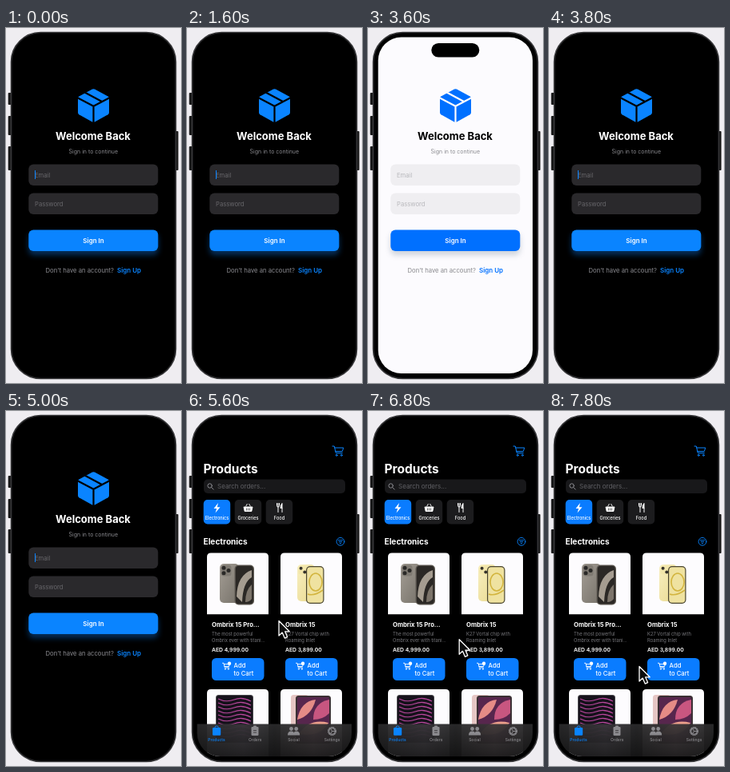
Recreate the animation shown at these times as an HTML page. Size 219x444 px, loop 8 s.

```html
<!DOCTYPE html>
<html lang="en">
<head>
<meta charset="utf-8">
<title>Shop sign-in</title>
<style>
  html, body { margin: 0; width: 100%; height: 100%; overflow: hidden; background: #efedf1; }
  svg { display: block; width: 100%; height: 100%; font-family: Inter, sans-serif; }
  .dark { --bg: #000; --ink: #fff; --muted: #8a8a8f; --hint: #68676b; --field: #2a292c; --blue: #0a84ff; --glow: #0a84ff; --glow-alpha: .36; }
  .light { --bg: #fcfbfe; --ink: #000; --muted: #8a8a8e; --hint: #b8b8bc; --field: #efeef1; --blue: #0070ff; --glow: #4a6078; --glow-alpha: .26; }
  .bg { fill: var(--bg); }
  .ink { fill: var(--ink); }
  .muted { fill: var(--muted); }
  .hint { fill: var(--hint); }
  .field { fill: var(--field); }
  .blue { fill: var(--blue); }
  .mid { text-anchor: middle; }
  .b { font-weight: 700; }
  .sb { font-weight: 600; }
  .line { fill: none; stroke: currentColor; stroke-linecap: round; stroke-linejoin: round; }
</style>
</head>
<body>
<svg viewBox="0 0 219 444" preserveAspectRatio="none" xmlns="http://www.w3.org/2000/svg">
  <defs>
    <clipPath id="screen"><rect x="12.700" y="11.500" width="193.300" height="420.500" rx="29"/></clipPath>
    <filter id="blur" x="-20%" y="-60%" width="140%" height="220%"><feGaussianBlur stdDeviation="3.600"/></filter>
    <linearGradient id="titanium" x2="1" y2="1"><stop stop-color="#a39d94"/><stop offset="1" stop-color="#77726a"/></linearGradient>
    <linearGradient id="yellow" x2="1" y2="1"><stop stop-color="#f8efc0"/><stop offset="1" stop-color="#e9d98f"/></linearGradient>
    <linearGradient id="bar" x2="1"><stop stop-color="#29292a"/><stop offset=".3" stop-color="#373539"/><stop offset=".5" stop-color="#29292a"/><stop offset=".75" stop-color="#3b3638"/><stop offset="1" stop-color="#29292a"/></linearGradient>
    <linearGradient id="fade" x2="0" y2="1"><stop stop-opacity="0"/><stop offset="1" stop-opacity=".5"/></linearGradient>

    <g id="cart" class="line">
      <path d="M0 .5h2.300l2 8.500h8M2.800 2.500h11l-1.500 4.500H3.900"/>
      <circle cx="5.200" cy="11.800" r="1"/><circle cx="11.300" cy="11.800" r="1"/>
    </g>
  </defs>

  <!-- phone body -->
  <g fill="#161617">
    <rect x="2.700" y="81" width="5" height="15" rx="1"/>
    <rect x="2.700" y="110" width="5" height="24" rx="1"/>
    <rect x="2.700" y="148" width="5" height="30" rx="1"/>
    <rect x="211" y="129" width="4.600" height="49" rx="1"/>
  </g>
  <rect x="6.400" y="5.400" width="206.200" height="433.200" rx="37" fill="#0b0b0c" stroke="#38383a" stroke-width="1.400"/>
  <rect x="8.500" y="7.500" width="202" height="429" rx="34" fill="#000"/>

  <g clip-path="url(#screen)">
    <g id="login" class="dark">
      <rect class="bg" width="219" height="444"/>
      <path class="blue" d="M108 76.600q1.500-.8 3 0L127.600 85.500q1.400.8 1.400 2.300v18q0 1.600-1.400 2.400L111 117.400q-1.500.8-3 0L91.400 108.200q-1.400-.8-1.400-2.400v-18q0-1.500 1.400-2.300z"/>
      <path d="M89.500 87.200L109.500 97.800L129.500 87.200M109.500 97.800V119M98.500 80.500L120 92" fill="none" stroke="var(--bg)" stroke-width="2.200"/>
      <text class="ink b mid" x="109" y="139.800" font-size="13">Welcome Back</text>
      <text class="muted mid" x="109.300" y="157" font-size="7">Sign in to continue</text>
      <rect class="field" x="28.300" y="170.500" width="162" height="26.500" rx="6"/>
      <rect class="field" x="28.300" y="206.500" width="162" height="26.500" rx="6"/>
      <text class="hint" x="36" y="187" font-size="7.700">Email</text>
      <text class="hint" x="36" y="222.700" font-size="7.700">Password</text>
      <rect id="caret" class="blue" x="36" y="178" width="1" height="11"/>
      <rect x="28.300" y="257" width="162" height="27" rx="6" fill="var(--glow)" opacity="var(--glow-alpha)" filter="url(#blur)"/>
      <rect class="blue" x="28.300" y="252.500" width="162" height="26.500" rx="6"/>
      <text class="sb mid" x="109.500" y="268.800" font-size="8" fill="#fff">Sign In</text>
      <text class="muted" x="49.500" y="306.200" font-size="7.700">Don't have an account?</text>
      <text class="blue sb" x="139" y="306.200" font-size="8">Sign Up</text>
    </g>

    <g id="shop" class="dark" visibility="hidden">
      <rect width="219" height="444"/>
      <use href="#cart" x="182" y="43.500" color="#0a84ff"/>
      <text class="b ink" x="20.500" y="78" font-size="15.500">Products</text>
      <rect x="21" y="85.500" width="177" height="17.500" rx="5" fill="#18181a"/>
      <g class="line" color="#8a8a8f"><circle cx="28.600" cy="93.500" r="2.700"/><path d="M30.700 95.600l2.500 2.500"/></g>
      <text x="38" y="97" font-size="8" fill="#606065">Search orders...</text>
      <g id="chips"></g>
      <path d="M39 115l-5.500 7h3.600l-1.600 5.500 6-7.200h-3.700z" fill="#fff"/>
      <path d="M71 120h11l-1.200 5.500h-8.600zM73.500 119.500l2-3.500M79.500 119.500l-2-3.500" fill="#fff" stroke="#fff" stroke-width=".9"/>
      <path d="M74.500 121.500v3M76.500 121.500v3M78.500 121.500v3" stroke="#1c1c1e" stroke-width=".7"/>
      <g class="line" color="#fff"><path d="M112.500 115.500v3q0 1.500 1.500 1.500t1.500-1.500v-3M114 115.500v11"/><path d="M119 126.500v-11q-2 2-2 6h2" fill="#fff"/></g>
      <text class="b ink" x="20.500" y="167" font-size="10.100">Electronics</text>
      <g class="line" color="#0a84ff" stroke-width=".9"><circle cx="192" cy="163.300" r="4.900"/><path d="M189.200 161.600h5.600M190.200 163.600h3.600M191.200 165.600h1.600"/></g>
      <g id="cards"></g>

      <!-- product pictures -->
      <g>
        <rect x="41" y="191" width="24" height="49" rx="5" fill="url(#titanium)"/>
        <rect x="42.500" y="192.500" width="13" height="14" rx="3.500" fill="#7f7a72"/>
        <g fill="#2a2927"><circle cx="46" cy="196.300" r="2.500"/><circle cx="46" cy="202.800" r="2.500"/><circle cx="52" cy="199.500" r="2.500"/></g>
        <rect x="59.500" y="192.500" width="24.500" height="50" rx="5" fill="#5e5952"/>
        <rect x="60.800" y="193.800" width="21.900" height="47.400" rx="4" fill="#2b2825"/>
        <path d="M62 232q1-27 19-33v9q-11 6-12 31z" fill="#a59c90"/>
        <path d="M73 239q0-15 8-22v18q-3 4-8 4z" fill="#7c746a"/>
      </g>
      <g>
        <rect x="138" y="192" width="22" height="46" rx="5" fill="url(#yellow)"/>
        <rect x="139.500" y="193.500" width="11" height="11" rx="3" fill="#f2e6aa"/>
        <g fill="#37342c"><circle cx="142.600" cy="196.700" r="2"/><circle cx="147.300" cy="201.400" r="2"/></g>
        <rect x="149" y="194" width="22.500" height="47" rx="5" fill="#4b4630"/>
        <rect x="150.200" y="195.200" width="20.100" height="44.600" rx="4" fill="#efe2a0"/>
        <g fill="none" stroke="#d3b53f" stroke-width="1.600"><ellipse cx="161" cy="214" rx="8" ry="11"/><path d="M151 229q8 3 19-5"/></g>
      </g>
      <g>
        <rect x="36" y="355" width="47" height="60" rx="3.500" fill="#49484c"/>
        <rect x="37" y="356" width="45" height="58" rx="2.500" fill="#17121c"/>
        <path id="strands" fill="none" stroke="#b8479c" stroke-width="1.100"/>
      </g>
      <g>
        <rect x="130" y="355" width="22" height="60" rx="3.500" fill="#e6c6c4"/>
        <rect x="136" y="356" width="44" height="60" rx="3.500" fill="#3b3034"/>
        <rect x="138" y="358" width="40" height="56" rx="2" fill="#57264d"/>
        <path d="M138 386q4-23 23-25-5 20-23 25z" fill="#e58b86"/>
        <path d="M158 386q0-21 20-25v17q-8 8-20 8z" fill="#c85680"/>
        <path d="M140 404q13-20 37-14-9 18-37 14z" fill="#eda08c"/>
      </g>

      <g>
        <rect x="12" y="391.500" width="195" height="42" fill="url(#bar)" opacity=".96"/>
        <rect x="12" y="391.500" width="195" height="42" fill="url(#fade)"/>
      </g>
      <g id="tabs"></g>
      <rect x="32" y="396" width="10.200" height="9.800" rx="1.300" fill="#0a84ff"/>
      <path d="M35 396.300v-.6q0-1.700 2.100-1.700t2.100 1.700v.6" fill="none" stroke="#0a84ff"/>
      <g fill="#8b8a8e">
        <rect x="80.500" y="395" width="9" height="11" rx="1.200"/><rect x="83" y="393.500" width="4" height="3" rx="1"/>
        <circle cx="130.500" cy="397.500" r="2.400"/><circle cx="136.700" cy="397.500" r="2.400"/>
        <path d="M126 405.500q0-5 4.500-5 3 0 3.200 2 .4-2 3-2 4.500 0 4.500 5z"/>
      </g>
      <path d="M83 399.500h4M83 402h4" stroke="#302e31" stroke-width=".8"/>
      <g class="line" color="#8b8a8e"><circle cx="181.500" cy="400.500" r="4.700" stroke-width="1.600" stroke-dasharray="2.100 .36" stroke-linecap="butt"/><circle cx="181.500" cy="400.500" r="3.700"/><path d="M181.500 400.500h3.500M181.500 400.500l-1.800-3M181.500 400.500l-1.800 3"/></g>

      <path id="pointer" d="M0 0V18.500L4.200 14.600L7.200 21.600L10.600 20.100L7.700 13.300H13.200Z" fill="#0c0c0c" stroke="#fff" stroke-width="1.300" stroke-linejoin="round"/>
    </g>

    <rect x="79.300" y="19" width="60" height="17.500" rx="8.750" fill="#000"/>
  </g>
</svg>
<script>
const LOOP = 8000;
const byId = id => document.getElementById(id);
const login = byId('login'), shop = byId('shop'), caret = byId('caret'), pointer = byId('pointer');

const text = (x, y, size, label, attrs = 'fill="#fff"') =>
  `<text x="${x}" y="${y}" font-size="${size}" ${attrs}>${label}</text>`;

byId('chips').innerHTML = ['Electronics', 'Groceries', 'Food'].map((label, i) => {
  const x = 20.7 + i * 39;
  return `<rect x="${x}" y="111" width="33.500" height="30.500" rx="5" fill="${i ? '#1c1c1e' : '#0a7cff'}"/>` +
    text(x + 16.8, 136.3, 5.6, label, 'class="mid" font-weight="500" fill="#fff"');
}).join('');

const products = [
  ['Ombrix 15 Pro...', 'The most powerful', 'Ombrix ever with titani...', 'AED 4,999.00'],
  ['Ombrix 15', 'K27 Vortal chip with', 'Roaming Inlet', 'AED 3,899.00'],
];
byId('cards').innerHTML = products.map(([name, line1, line2, price], i) => {
  const x = 25 + i * 92;
  return `<path d="M${x} 254.300V182.500q0-5 5-5h67q5 0 5 5v71.800z" fill="#fdfcfe"/>
    <path d="M${x} 432V353q0-5 5-5h67q5 0 5 5v79z" fill="#fdfcfe"/>` +
    text(x + 6, 269.8, 7.7, name, 'class="b" fill="#fff"') +
    text(x + 6, 281, 5.8, line1, 'fill="#77777c"') +
    text(x + 6, 288.6, 5.8, line2, 'fill="#77777c"') +
    text(x + 6, 301.3, 6.8, price, 'class="sb" fill="#fff"') +
    `<rect x="${x + 6}" y="309" width="65.500" height="28" rx="5.500" fill="#0a7cff"/>
    <use href="#cart" transform="translate(${x + 19.5} 315) scale(.65)" color="#fff" stroke-width="1.400"/>
    <circle cx="${x + 28}" cy="315.800" r="2.200" fill="#fff"/>` +
    text(x + 33.5, 321, 7.7, 'Add', 'fill="#fff" font-weight="500"') +
    text(x + 33.5, 331.3, 7.7, 'to Cart', 'fill="#fff" font-weight="500"');
}).join('');

byId('strands').setAttribute('d', Array.from({ length: 10 }, (_, i) =>
  `M39 ${360 + i * 5}q10 5 20 1t21 2`).join(''));

byId('tabs').innerHTML = ['Products', 'Orders', 'Social', 'Settings'].map((label, i) =>
  text(37 + i * 48.2, 413, 5, label, `class="mid" font-weight="500" fill="${i ? '#8b8a8e' : '#0a84ff'}"`)
).join('');

// [start time, caret opacity]
const blinks = [[0, 1], [200, 0], [600, 1], [1000, .5], [1200, 0], [1600, 1], [2000, 0],
  [2600, 1], [3000, .5], [3200, 0], [3800, 1], [4600, 0], [5000, 1]];
const ease = p => p * p * (3 - 2 * p);

function draw(t) {
  const inShop = t >= 5600;
  login.setAttribute('visibility', inShop ? 'hidden' : 'visible');
  shop.setAttribute('visibility', inShop ? 'visible' : 'hidden');
  login.setAttribute('class', t >= 2000 && t < 3800 ? 'light' : 'dark');
  caret.setAttribute('opacity', blinks.findLast(([start]) => t >= start)[1]);
  const p = ease(Math.min(1, Math.max(0, (t - 6100) / 1600)));
  pointer.setAttribute('transform', `translate(${115 - 2 * p} ${262.5 + 57 * p})`);
}

const begin = performance.now();
function tick() {
  draw((performance.now() - begin) % LOOP);
  requestAnimationFrame(tick);
}
draw(0);
requestAnimationFrame(tick);
</script>
</body>
</html>
```
